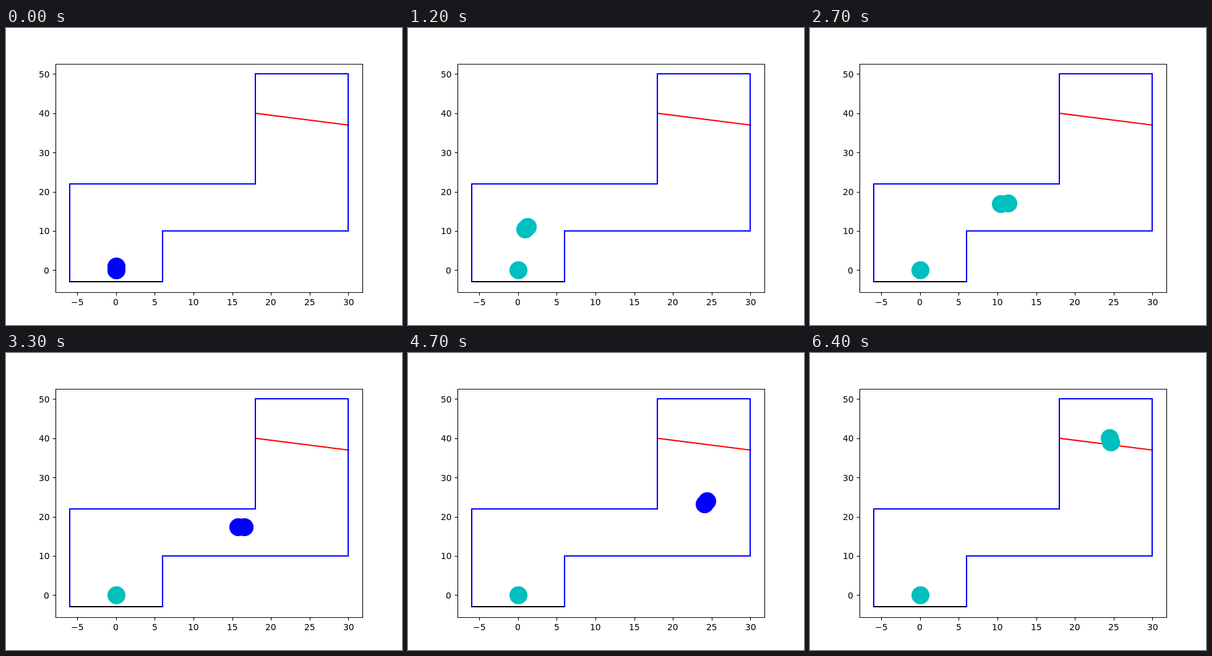
Recreate the animation shown at these times as an HTML page with a canvas. Size 640 by 480 pixels, loop 6500 ms.

```html
<!DOCTYPE html>
<html lang="en">
<head>
<meta charset="utf-8">
<title>Car on a track</title>
<style>
html, body { margin: 0; width: 100%; height: 100%; overflow: hidden; background: #fff; }
canvas { display: block; }
</style>
</head>
<body>
<canvas id="stage" width="640" height="480"></canvas>
<script>
const ctx = document.getElementById('stage').getContext('2d');
const STEP_MS = 100, STEPS = 65;
const BLUE = '#0000ff', CYAN = '#00bfbf';
const PT = 100 / 72;
const AXES = { left: 80.5, right: 576.5, top: 58.5, bottom: 427.5 };

// Data units to pixels
const toX = x => 80 + (x + 7.8) * 496 / 39.6;
const toY = y => 427.2 - (y + 5.65) * 369.6 / 58.3;

// The car passes one waypoint every five steps
const SPACING = 5;
const WAYPOINTS = [
  [0, 0], [0, 4.7], [0.45, 9], [2, 12.46], [4.77, 15.09], [8.5, 16.58], [13.26, 17.28],
  [17.27, 17.57], [20.7, 19.14], [23.29, 21.97], [24.85, 25.6], [25.43, 30.24],
  [25.05, 35.15], [24.49, 40.08]
];

function tangent(i, axis) {
  const a = Math.max(i - 1, 0), b = Math.min(i + 1, WAYPOINTS.length - 1);
  return (WAYPOINTS[b][axis] - WAYPOINTS[a][axis]) / (b - a);
}

// Catmull-Rom curve through the waypoints
function carAt(step) {
  const i = Math.min(Math.floor(step / SPACING), WAYPOINTS.length - 2);
  const u = step / SPACING - i, v = 1 - u;
  return [0, 1].map(axis =>
    WAYPOINTS[i][axis] * v * v * (1 + 2 * u) + WAYPOINTS[i + 1][axis] * u * u * (3 - 2 * u) +
    u * v * (v * tangent(i, axis) - u * tangent(i + 1, axis)));
}

// Cyan while steering right, blue otherwise
const carColor = step => (step > 0 && step < 32) || step === STEPS - 1 ? CYAN : BLUE;

function line(points, color, width, cap = 'butt') {
  ctx.strokeStyle = color;
  ctx.lineWidth = width;
  ctx.lineCap = cap;
  ctx.beginPath();
  points.forEach(([x, y]) => ctx.lineTo(x, y));
  ctx.stroke();
}

function dot([x, y], color) {
  ctx.fillStyle = color;
  ctx.beginPath();
  ctx.arc(Math.round(toX(x)) + 0.5, Math.round(toY(y)) + 0.5, 10.5 * PT, 0, 2 * Math.PI);
  ctx.fill();
}

// Text on whole pixels; align 0.5 centres on x, 1 ends at x
function label(n, x, y, align) {
  const text = String(n).replace('-', '\u2212');
  const left = x - ctx.measureText(text).width * align;
  ctx.fillText(text, Math.round(left), Math.round(y));
}

const snapped = points => points.map(([x, y]) => [Math.round(toX(x)), Math.round(toY(y))]);

function drawTrack() {
  const width = 1.5 * PT;
  line(snapped([[-6, -3], [6, -3]]), '#000', width, 'square');
  line([[18, 40], [30, 37]].map(([x, y]) => [toX(x), toY(y)]), '#ff0000', width, 'square');
  line(snapped([[-6, -3], [-6, 22], [18, 22], [18, 50], [30, 50], [30, 10], [6, 10], [6, -3]]),
    BLUE, width, 'square');
}

function drawAxes() {
  const { left, right, top, bottom } = AXES;
  const width = 0.8 * PT, tick = 3.5 * PT;
  line([[left, top], [right, top], [right, bottom], [left, bottom], [left, top]],
    '#000', width, 'square');
  ctx.fillStyle = '#000';
  ctx.font = `${10 * PT}px "DejaVu Sans", sans-serif`;
  for (let n = -5; n <= 30; n += 5) {
    const x = Math.round(toX(n)) + 0.5;
    line([[x, bottom], [x, bottom + tick]], '#000', width);
    label(n, toX(n), 448, 0.5);
  }
  for (let n = 0; n <= 50; n += 10) {
    const y = Math.round(toY(n)) + 0.5;
    line([[left, y], [left - tick, y]], '#000', width);
    label(n, 70.3, toY(n) + 5.5, 1);
  }
}

function draw(now) {
  const step = Math.floor(now / STEP_MS) % STEPS;
  ctx.fillStyle = '#fff';
  ctx.fillRect(0, 0, 640, 480);
  drawTrack();
  dot([0, 0], CYAN);
  dot(carAt(step), carColor(step));
  dot(carAt(step + 1), carColor(step));
  drawAxes();
}

const start = performance.now();
function loop() {
  draw(performance.now() - start);
  requestAnimationFrame(loop);
}
loop();
</script>
</body>
</html>
```
